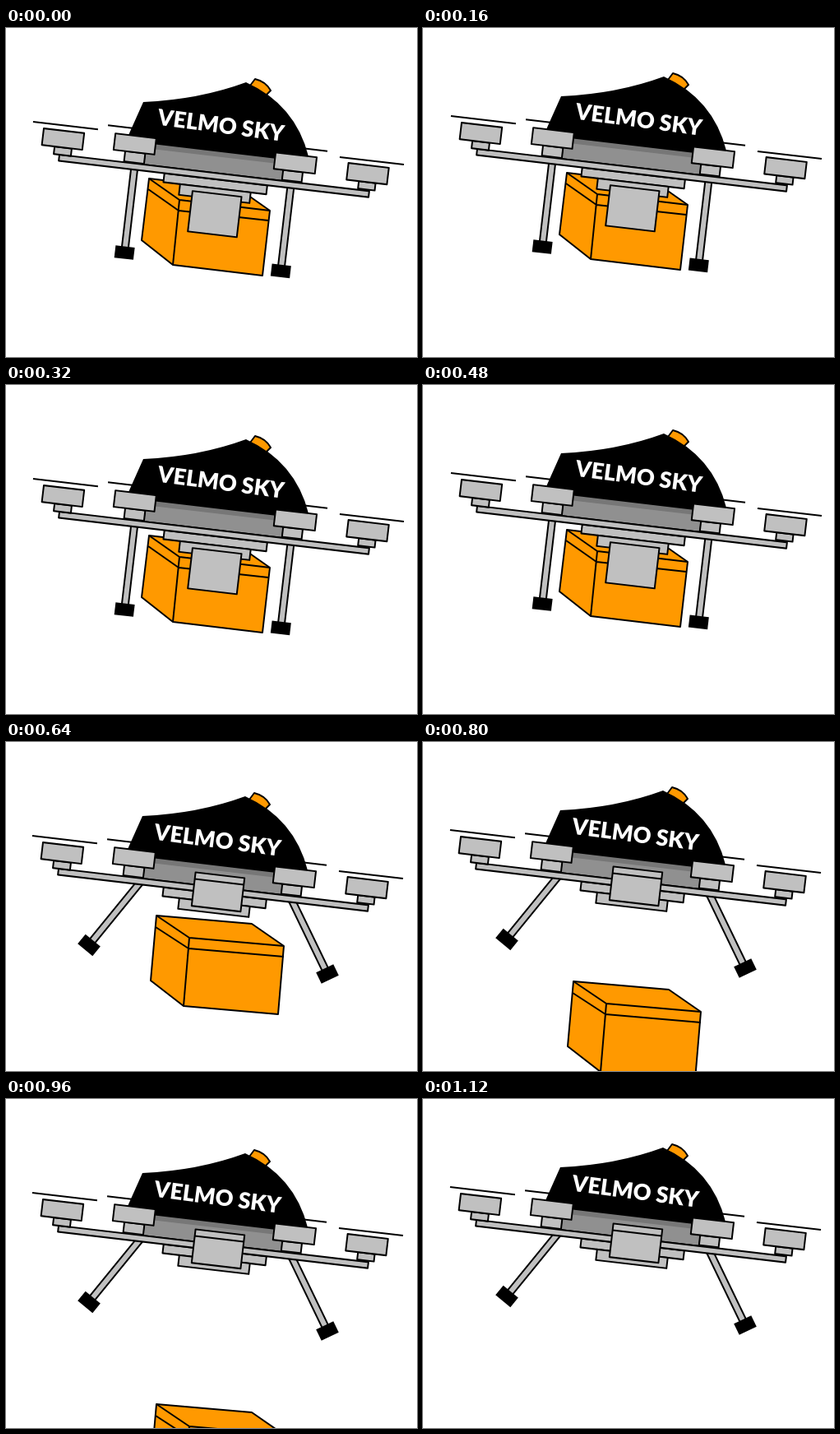
An HTML page that plays this animation: 500 px wide and 400 px high, repeating every 1.28 s.

```html
<!DOCTYPE html>
<html lang="en">
<head>
<meta charset="utf-8">
<title>Delivery drone</title>
<style>
  html, body { margin: 0; width: 100%; height: 100%; overflow: hidden; background: #fff; }
  svg { display: block; width: 500px; height: 400px; }
  .line { stroke: #000; stroke-width: 2; stroke-linejoin: round; }
  .metal { fill: #c0c0c0; }
  .orange { fill: #f90; }
  text { font: 900 27px Lato, "Open Sans", sans-serif; fill: #fff; text-anchor: middle; }
</style>
</head>
<body>
<svg viewBox="0 0 500 400">
  <defs>
    <!-- The origin is the centre of the foot -->
    <g id="leg">
      <rect class="line metal" x="-4" y="-104" width="8" height="104"/>
      <rect x="-11.7" y="-7.5" width="23.4" height="15"/>
    </g>
  </defs>

  <g id="falling" class="line orange">
    <path d="M183 211L299 221L338 248L331 331L216 321L176 290Z"/>
    <path fill="none" d="M183 211L223 238L338 248M223 238L216 321M182 225L222 251L338 261"/>
  </g>

  <g id="drone">
    <g id="carried" class="line orange">
      <path d="M174 183L284 196L321 222L312 301L203 288L165 258Z"/>
      <path fill="none" d="M174 183L211 209L321 222M211 209L203 288M173 196L210 222L319 234"/>
    </g>
    <path class="line orange" d="M297 70L303 62Q316 65 322 76L314 84Z"/>
    <path d="M148 134L150 128L167 90Q235 87 292 66Q352 93 368 156L326 160L182 143Z"/>

    <g transform="translate(65 154) rotate(6.7)">
      <g id="legs"><use href="#leg"/><use href="#leg"/></g>
      <rect class="line" fill="#909090" x="103" y="-26" width="170" height="26"/>
      <rect fill="#777" x="104" y="-26" width="168" height="6"/>
      <path class="line" d="M-36.5 -36H43M54.5 -42.3H323.3M339 -36.9H417.6"/>

      <g class="line metal">
        <rect x="129.5" y="7.5" width="126" height="11"/>
        <rect x="150" y="18.5" width="86.5" height="13"/>
        <rect width="379.5" height="7.5"/>
        <rect x="-7" y="-9" width="21" height="9"/>
        <rect x="-22.6" y="-29.5" width="49.5" height="20.3"/>
        <rect x="79" y="-13.6" width="24.5" height="12.6"/>
        <rect x="64.7" y="-33.6" width="50" height="20"/>
        <rect x="272.5" y="-13.3" width="24" height="12"/>
        <rect x="261" y="-33.4" width="50.3" height="20"/>
        <rect x="365.5" y="-10.5" width="20.5" height="9"/>
        <rect x="350.4" y="-31" width="49.5" height="20.5"/>
        <rect id="gripper" x="166" width="60"/>
        <path id="hinge" d="M166 -7H226"/>
      </g>
      <text id="label">VELMO SKY</text>
    </g>
  </g>
</svg>

<script>
  const STEP = 160, STEPS = 8, RELEASE = 4;
  const el = id => document.getElementById(id);
  const set = (node, attrs) => {
    for (const name in attrs) node.setAttribute(name, attrs[name]);
  };
  const show = (id, on) => set(el(id), { visibility: on ? 'visible' : 'hidden' });
  const [leftLeg, rightLeg] = el('legs').children;

  function draw(step) {
    const open = step >= RELEASE;
    const up = step % 2;

    set(el('drone'), { transform: `translate(${up - open} ${-7 * up})` });
    set(leftLeg, { transform: open ? 'translate(47.6 88) rotate(32.5)' : 'translate(92.5 109)' });
    set(rightLeg, { transform: open ? 'translate(339.7 89) rotate(-32.5)' : 'translate(284 109)' });
    set(el('gripper'), open ? { y: -15, height: 41 } : { y: 25, height: 49.5 });
    set(el('label'), { transform: `translate(${open ? '188 -47.6' : '191 -49'}) rotate(0.8)` });
    set(el('falling'), { transform: `translate(0 ${80 * (step - RELEASE)})` });

    show('carried', !open);
    show('falling', open);
    show('hinge', open);
  }

  const start = performance.now();
  function tick() {
    draw(Math.floor((performance.now() - start) / STEP) % STEPS);
    requestAnimationFrame(tick);
  }
  tick();
</script>
</body>
</html>
```
